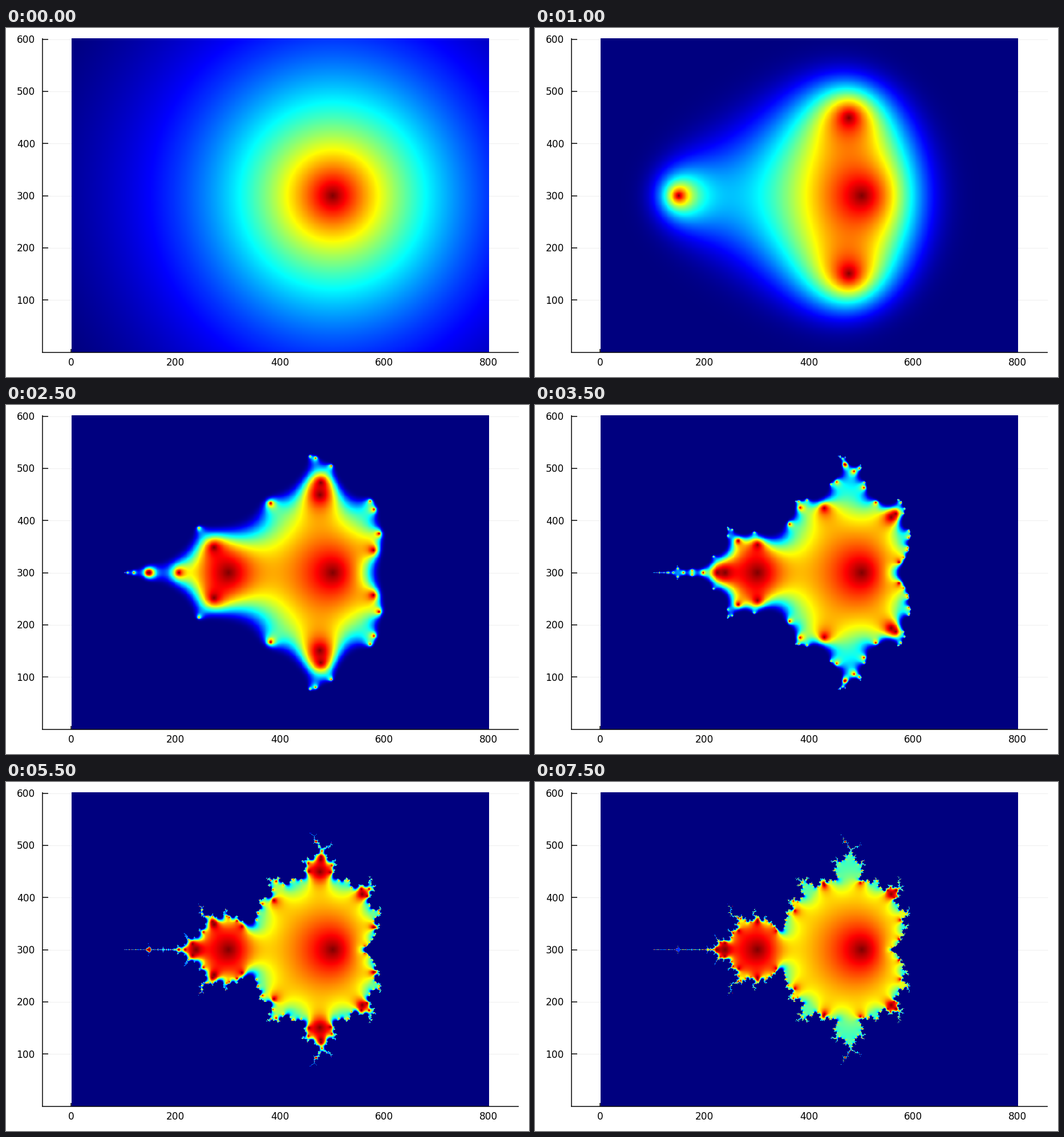
A matplotlib script for the animation above (8000 ms loop, 917 by 611 pixels).

```python
import numpy as np
import matplotlib.pyplot as plt
from matplotlib.animation import FuncAnimation
from matplotlib.colors import LinearSegmentedColormap

W, H, DPI = 917, 611, 64
PT = 72 / DPI                        # points per pixel
FRAMES, INTERVAL = 16, 500
LEFT, TOP, COLS, ROWS = 115, 18, 732, 550
AXIS_X, AXIS_Y, AXIS_END = 63.5, 567.5, 898.5

jet = LinearSegmentedColormap.from_list("jet9", [
    (0, 0, .5), (0, 0, 1), (0, .5, 1), (0, 1, 1), (.5, 1, .5),
    (1, 1, 0), (1, .5, 0), (1, 0, 0), (.5, 0, 0)], N=1024)

# Complex plane in steps of 0.005, sampled onto the pixel grid
re = np.arange(-500, 301) / 200
im = np.arange(300, -301, -1) / 200
c = re[None, :] + 1j * im[:, None]
pick = np.ix_(np.arange(ROWS) * im.size // ROWS,
              np.arange(COLS) * re.size // COLS)


def iterates():
    """Yield exp(-|z|), scaled to 0..1, for each step of z -> z^2 + c."""
    z = c.copy()
    for _ in range(FRAMES):
        v = np.exp(-np.abs(z))
        yield ((v - v.min()) / (v.max() - v.min()))[pick]
        z = z * z + c
        z[np.abs(z) > 1e3] = 1e3


fields = list(iterates())


def px(v):
    return 480.8 + (v - 401) * .9142


def py(v):
    return 292.8 + (301 - v) * .9135


fig = plt.figure(figsize=(W / DPI, H / DPI), dpi=DPI, facecolor="white")
ax = fig.add_axes([0, 0, 1, 1])
ax.axis("off")


def line(x0, y0, x1, y1, width=1.5, color="black", z=1):
    ax.plot([x0, x1], [y0, y1], color=color, lw=width * PT,
            solid_capstyle="butt", zorder=z)


def label(x, y, text, align):
    ax.text(x, y + 6.2, text, fontsize=17 * PT, family="DejaVu Sans",
            ha=align, va="baseline")


for v in range(100, 601, 100):
    y = py(v)
    line(AXIS_X, y, AXIS_END, y, 1, "#eeeeee", 0)
    line(AXIS_X, y, 73.5, y)
    label(51, y, str(v), "right")
for v in range(0, 801, 200):
    x = px(v)
    line(x, AXIS_Y, x, AXIS_Y - 6)
    label(x, 584.5, str(v), "center")
line(AXIS_X, TOP, AXIS_X, AXIS_Y + .75, z=3)
line(AXIS_X - .75, AXIS_Y, AXIS_END, AXIS_Y, z=3)

img = ax.imshow(fields[0], cmap=jet, vmin=0, vmax=1, interpolation="nearest",
                extent=(LEFT, LEFT + COLS, TOP + ROWS, TOP),
                aspect="auto", zorder=2)
ax.set_xlim(0, W)
ax.set_ylim(H, 0)


def update(i):
    img.set_data(fields[i])
    return (img,)


anim = FuncAnimation(fig, update, frames=FRAMES, interval=INTERVAL,
                     repeat=True, repeat_delay=0, blit=False)
plt.show()
```
